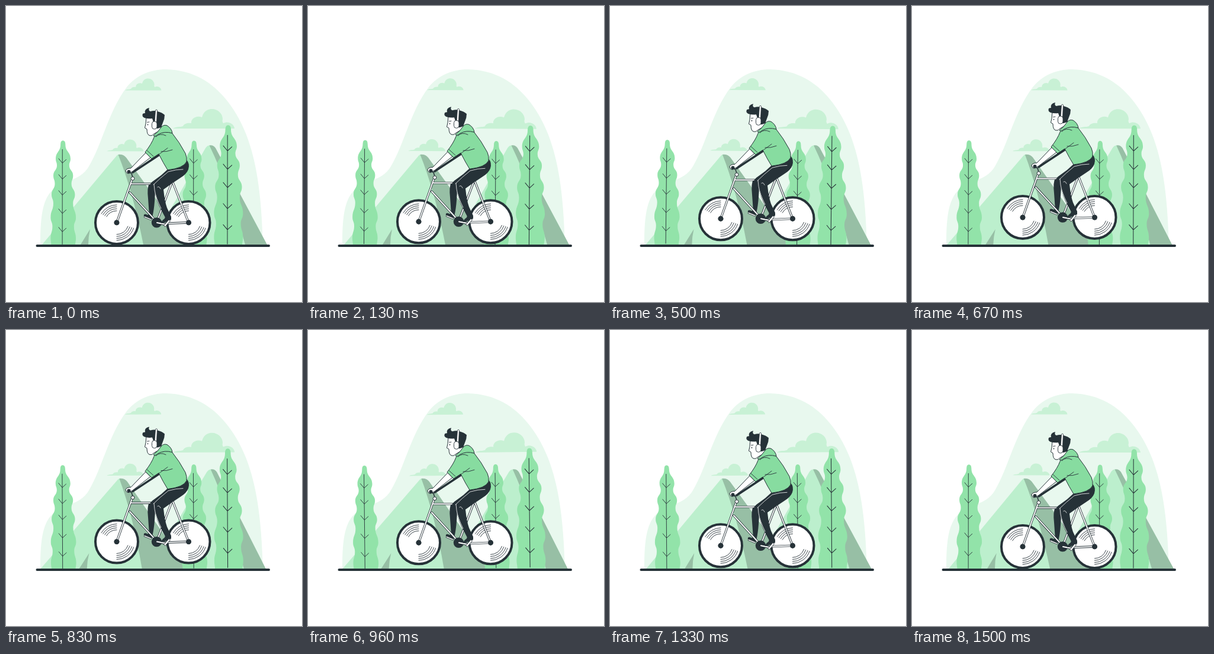
Recreate the animation shown at these times as an HTML page. Size 500x500 px, loop 1.54 s.

```html
<!DOCTYPE html>
<html lang="en">
<head>
<meta charset="utf-8">
<title>Cyclist</title>
<style>
  html, body { margin: 0; width: 100%; height: 100%; overflow: hidden; background: #fff; }
  svg { display: block; width: 100vw; height: 100vh; }
  .line { fill: none; stroke: #263238; stroke-linecap: round; stroke-linejoin: round; }
  .dark { fill: #263238; }
  .skin { fill: #fff; stroke: #263238; stroke-linejoin: round; }
  .hoodie { fill: #87dca0; stroke: #263238; stroke-linejoin: round; }
  .seam { fill: none; stroke: #fff; stroke-width: .8; stroke-linecap: round; }
</style>
</head>
<body>
<svg viewBox="0 0 500 500">
  <defs>
    <path id="cloud" fill="#c8f1d5" d="M0 33C6 29 12 31 17 29C19 24 26 23 31 24C30 16 40 10 49 14C52 2 61 0 66 0C76 0 84 8 84 17C83 21 84 22 85 24C94 19 104 26 104 33Z"/>
    <g id="tree">
      <path id="leaves" fill="#92e3a9"/>
      <path class="line" stroke-width=".9" d="M-.8 15V175M-7 30.500l6.200 7.500 6.500-6M-7 57.500l6.200 7.500 6.500-6M-7 84.500l6.200 7.500 6.500-6M-7 115.500l6.200 7.500 6.500-6M-7 146.500l6.200 7.500 6.500-6"/>
    </g>
    <g id="wheel">
      <circle r="36" fill="#fff" stroke="#263238" stroke-width="4"/>
      <path id="grooves" class="line" stroke-width=".9"/>
      <circle r="4.4" class="dark"/>
    </g>
    <path id="tubes" d="M187 366L213 293M212 300.5H252M209 315L253 363M281 296L255 364M281 296L308.5 366M256 368L308.5 366"/>
  </defs>

  <path fill="#e8f8ee" d="M58 403C58 365 60 334 74 316C93 293 124 298 140 271C163 232 173 178 204 137C220 117 244 107 270 107C317 108 349 130 371 157C417 213 431 290 434 403Z"/>

  <g id="clouds">
    <use href="#cloud" transform="translate(201 122.5) scale(.59 .605)"/>
    <use href="#cloud" transform="translate(282 174)"/>
    <use href="#cloud" transform="translate(170 225.5) scale(.6 .605)"/>
  </g>

  <g id="mountains">
    <path fill="#bcefcd" d="M244 403L337 240Q342 233 348 237L408 403Z"/>
    <path fill="#97bfa5" d="M343.500 235.500Q350 234 354 240L441 403H404Q376 302 343.500 235.500Z"/>
    <path fill="#bcefcd" d="M61 403L186 254Q190 248 196 253L236 403Z"/>
    <path fill="#97bfa5" d="M189.500 251Q198 250 203 256L309 403H232Q214 312 189.500 251Z"/>
    <path fill="#97bfa5" d="M126 403L142 377Q139 390 139 403Z"/>
  </g>

  <g id="trees">
    <use href="#tree" transform="translate(317.500 227.500)"/>
    <use href="#tree" transform="translate(96 227.500)"/>
    <use href="#tree" transform="translate(375 201) scale(1.148)"/>
  </g>

  <path class="line" stroke-width="4" d="M52.500 405H444"/>

  <g id="rider">
    <!-- far arm and leg -->
    <path class="line" stroke-width="3.500" d="M214 281L258 252"/>
    <path class="dark" d="M242 300L253 297L251 330Q250 344 247.500 355L242 353Q241 340 240 325Q238 307 242 300Z"/>
    <path class="dark" d="M242 350L248 356L246 360L233 355Q232 352 235 351.500L240 353Z"/>
    <path class="skin" stroke-width=".8" d="M234 355L246 360L245 362L233 357Z"/>

    <use href="#wheel" x="187" y="366"/>
    <use href="#wheel" x="308.500" y="366"/>
    <use href="#tubes" fill="none" stroke="#263238" stroke-width="3.600" stroke-linecap="round"/>
    <use href="#tubes" fill="none" stroke="#fff" stroke-width="1.900" stroke-linecap="round"/>
    <circle cx="187" cy="366" r="4.400" class="dark"/>
    <circle cx="308.500" cy="366" r="4.400" class="dark"/>
    <path class="line" stroke-width="1.500" d="M207 280L212 283L214 289"/>
    <circle class="skin" cx="214" cy="291.500" r="2.900"/>
    <circle class="dark" cx="254.500" cy="366" r="8.700"/>
    <path class="line" stroke-width="4" d="M255 366L270 369"/>
    <path class="line" style="stroke:#fff" stroke-width="2" d="M255 366L270 369"/>

    <!-- near leg and shoe -->
    <path class="dark" d="M273 276L305 260Q311 266 308 276Q305 284 295 290Q281 299 266 310Q268 330 272 341L279 356L271 361L263 346Q254 330 251 312Q245 317 242 305Q243 299 251 294Q263 286 273 276Z"/>
    <path class="dark" d="M270 353L279 356L279 361L269 365L262 367Q263 362 268 359Z"/>
    <path class="skin" stroke-width=".9" d="M275 361L277.500 363L269 373L266.500 371Z"/>
    <path class="seam" d="M249 302Q260 291 274 280Q287 276 299 276M256 306Q259 304 261 309M250 301L251 311Q253 324 262 342"/>

    <!-- near arm -->
    <path class="skin" d="M236 248L211 274Q204 274 202 278Q203 283 207 283L213 280L244 256Z"/>
    <circle class="dark" cx="207.500" cy="280" r="3"/>

    <!-- head -->
    <path class="skin" d="M237 188L236 199L234.500 206L238 208Q238 218 243 219Q247 220 250 216L262 209L263 190Z"/>
    <path class="dark" d="M234 189Q229 187 231 182Q233 181 235 181Q233 174 242 172Q240 177 244 178Q250 176 256 178Q264 180 268 184Q268 191 265 197L262 205L256 207L248 205L249 196L247 190Q240 191 234 189Z"/>
    <path class="line" stroke-width=".9" d="M238.500 196.500L242 196"/>
    <circle class="dark" cx="239.500" cy="200.500" r=".9"/>
    <path class="skin" stroke-width=".8" d="M252.500 176Q254 174 255.500 176L254.500 196H251Z"/>
    <rect class="skin" stroke-width=".9" x="246.500" y="195" width="8.500" height="13" rx="4"/>

    <path class="hoodie" d="M253 217Q264 210 280 214Q293 230 303 249Q306 256 305 263Q300 274 273 277Q266 266 258 250L246 258L235 247Q246 233 250 222Z"/>
    <path class="hoodie" d="M249 219Q257 213 262 205Q266 200 272 202Q280 207 281 215Q268 211 257 217Q251 222 249 219Z"/>
    <path class="line" stroke-width=".9" d="M238 244L249 254M246 258Q262 249 273 240M262 246Q271 247 281 243M253 221Q260 214 270 219"/>
  </g>
</svg>
<script>
const $ = id => document.getElementById(id);

// Tree outline: alternating bulges and dips as [half width, height below the tip]
const bulges = [[4, 7], [12, 31], [10, 42], [16, 59], [13.5, 73], [19, 91], [16, 106], [20.5, 130], [17.5, 145], [20.5, 165], [19.5, 177]];
const side = scale => bulges.map(([w, y], i) => {
  if (!i) return `M0 0Q${w * scale} 0 ${w * scale} ${y}`;
  const [w0, y0] = bulges[i - 1], middle = (y0 + y) / 2;
  return `C${w0 * scale} ${middle} ${w * scale} ${middle} ${w * scale} ${y}`;
}).join('') + 'H0Z';
$('leaves').setAttribute('d', side(-1) + side(1.08));

const arc = (r, from, to) => {
  const point = deg => [Math.cos(deg * Math.PI / 180) * r, Math.sin(deg * Math.PI / 180) * r];
  return `M${point(from)}A${r} ${r} 0 0 1 ${point(to)}`;
};
$('grooves').setAttribute('d', [20, 23.4, 26.8, 30].map(r => arc(r, 210, 270) + arc(r, 18, 90)).join(''));

const interpolate = (keys, t) => {
  const i = Math.max(1, keys.findIndex(k => k[0] >= t));
  const [t0, v0] = keys[i - 1], [t1, v1] = keys[i];
  return v0 + (v1 - v0) * (t - t0) / (t1 - t0);
};
const bob = [[0, .2], [.5, -9.8], [1, .2]];
const wind = [[0, 0], [.25, 1], [.75, -1], [1, 0]];
const lean = [[0, 0], [.19, 0], [.33, -.4], [.45, -1.2], [.62, -1.8], [.78, -.1], [1, .7]];

const LOOP = 1540, FPS = 24, CYCLE = 36;
function draw(now) {
  const step = Math.floor((now % LOOP + 5) * FPS / 1000);
  const phase = (step + .5) / CYCLE % 1;
  const sway = interpolate(wind, phase);
  const set = (id, value) => $(id).setAttribute('transform', value);
  set('rider', `translate(0 ${interpolate(bob, phase)})`);
  set('trees', `rotate(${sway} 239.5 302)`);
  set('clouds', `rotate(${sway} 278 184)`);
  set('mountains', `translate(0 319) skewX(${interpolate(lean, Math.min(step / CYCLE, 1))}) translate(0 -319)`);
}
const start = performance.now();
function tick() {
  draw(performance.now() - start);
  requestAnimationFrame(tick);
}
tick();
</script>
</body>
</html>
```
